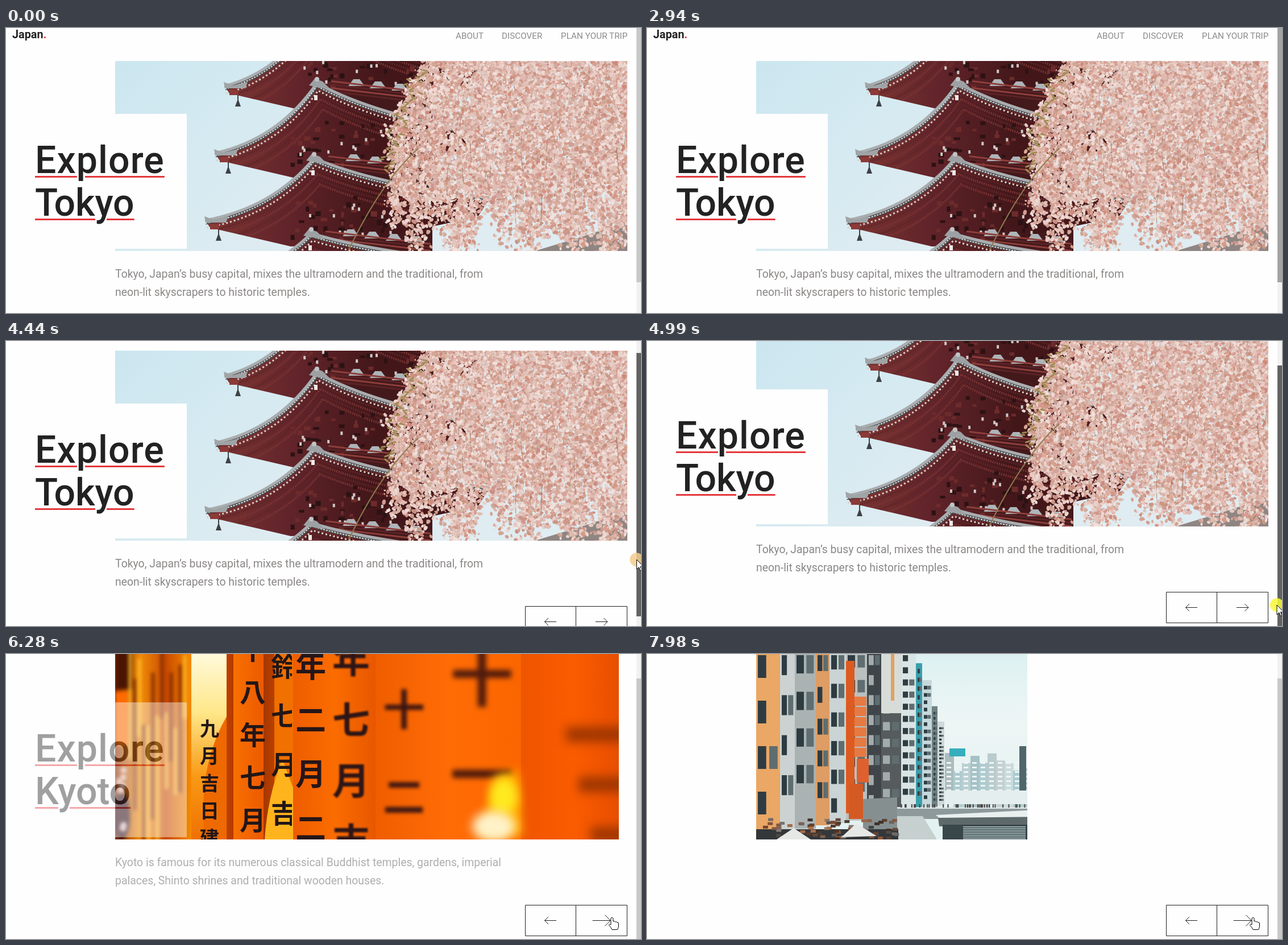
Write an HTML page with a canvas that moves like this. It is 1117x501 px and loops after 8 s.

```html
<!DOCTYPE html>
<html lang="en">
<head>
<meta charset="utf-8">
<title>Japan</title>
<style>
html, body { margin: 0; width: 100%; height: 100%; overflow: hidden; background: #fefefe; }
#stage { position: relative; width: 1117px; height: 501px; overflow: hidden; font-family: Roboto, sans-serif; color: #222; }
#stage div, #stage svg, canvas { position: absolute; }
#page { width: 1117px; height: 600px; }
.logo { left: 11px; top: 2px; font: bold 19.8px/20px Roboto, sans-serif; }
.logo i { color: #e0393e; font-style: normal; }
.nav { top: 4px; font-size: 15.3px; line-height: 20px; color: #8b8b8b; white-space: nowrap; }
#photo { left: 192px; top: 58px; height: 334px; overflow: hidden; }
canvas { left: 0; top: 0; }
#heading { left: 51px; top: 151px; width: 267px; height: 237px; background: #fefefe; }
#title { top: 44px; font-size: 66px; line-height: 75px; font-weight: 500; white-space: pre;
  text-decoration: underline #e5383d 3px; text-underline-offset: 5px; }
#title::first-line { letter-spacing: 1.1px; }
#text { left: 192px; top: 417px; font-size: 19.42px; line-height: 32px; color: #8b8887; white-space: pre; }
#next { vector-effect: non-scaling-stroke; }
#overlay { left: 0; top: 0; }
#track { left: 1109px; top: 0; width: 8px; height: 501px; background: #f1f1f1; }
#thumb { width: 8px; height: 463px; }
</style>
</head>
<body>
<div id="stage">
  <div id="page">
    <div class="logo">Japan<i>.</i></div>
    <div class="nav" style="left:791px">ABOUT</div>
    <div class="nav" style="left:872px">DISCOVER</div>
    <div class="nav" style="left:976px">PLAN YOUR TRIP</div>
    <div id="photo"></div>
    <div id="heading"><div id="title"></div></div>
    <div id="text"></div>
    <svg style="left:913px;top:507px" width="180" height="55" fill="none" stroke="#222">
      <path d="M.5 .5H179.5V54.5H.5ZM89.5 .5V54.5"/>
      <path d="M55 27.5H34.5M41 21L34.5 27.5L41 34"/>
      <path id="next" d="M-10.5 0H10.5M4 -6.5L10.5 0L4 6.5"/>
    </svg>
  </div>
  <div id="track"><div id="thumb"></div></div>
  <svg id="overlay" width="1117" height="501">
    <g id="cursor" fill="#fff" stroke="#000">
      <circle id="press" r="12" stroke="none"/>
      <path id="arrow" d="M0 0V17L4 13.5L6.5 19.5L9 18.5L6.5 12.5H12Z"/>
      <path id="hand" d="M-2 1.5Q0-1.5 2 1.5V7Q4 5.5 5.5 8Q8 6.5 9 9Q11.5 8 11.5 11V16Q11 19 9.5 21.5H0Q-2 17-5.5 13.5Q-5 11-2 13Z"/>
    </g>
  </svg>
</div>
<script>
const $ = id => document.getElementById(id);
const clamp = v => Math.max(0, Math.min(1, v));
const easeOut = v => 1 - (1 - clamp(v)) ** 3;
const between = (t, a, b) => t >= a && t < b;

function seeded(seed) {
  return () => (seed = (seed * 16807) % 2147483647) / 2147483647;
}

// Painters work in stage coordinates; `top` is the stage y of the photo's upper edge.
function photo(top, paint) {
  const canvas = document.createElement('canvas');
  canvas.width = 901;
  canvas.height = 334;
  const c = canvas.getContext('2d');
  c.translate(-192, -top);
  const rect = (color, x, y, w, h) => { c.fillStyle = color; c.fillRect(x, y, w, h); };
  const shape = (color, d) => { c.fillStyle = color; c.fill(new Path2D(d)); };
  const dot = (color, x, y, rx, ry = rx, turn = 0) => {
    c.fillStyle = color;
    c.beginPath();
    c.ellipse(x, y, rx, ry, turn, 0, 7);
    c.fill();
  };
  const gradient = (x0, y0, x1, y1, ...colors) => {
    const g = c.createLinearGradient(x0, y0, x1, y1);
    colors.forEach((color, i) => g.addColorStop(i / (colors.length - 1), color));
    return g;
  };
  paint({ c, rect, shape, dot, gradient });
  $('photo').append(canvas);
  return canvas;
}

function paintPagoda({ c, rect, shape, dot, gradient }) {
  const rnd = seeded(71);
  rect(gradient(192, 58, 500, 392, '#cbe6f0', '#d6eaf1', '#dfecf1'), 192, 58, 901, 334);
  rect('#43191c', 535, 58, 215, 334);

  for (let tier = 0; tier < 4; tier++) {
    const left = 385 - 17 * tier, eave = 103 + 118 * tier;
    const peak = 552 - 5 * tier, ridge = -34 + 132 * tier;
    const right = 830 + 10 * tier, end = 70 + 115 * tier;
    const curve = `M${left} ${eave}Q${left + .62 * (peak - left)} ${eave - .2 * (eave - ridge)} ${peak} ${ridge}` +
      `Q${peak + .35 * (right - peak)} ${ridge + .65 * (end - ridge)} ${right} ${end}`;
    const edge = new Path2D(curve);
    const soffit = new Path2D(`${curve}l-20 32L${peak + 60} ${ridge + 150}L${left + 150} ${eave + 45}l-142 -33Z`);
    const line = (color, width, dx, dy, ...dash) => {
      c.save();
      c.translate(dx, dy);
      c.strokeStyle = color;
      c.lineWidth = width;
      c.setLineDash(dash);
      c.stroke(edge);
      c.restore();
    };
    for (let i = 0; i < 4; i++) {
      shape(i % 2 ? '#5c2325' : '#8d3e3b', `M${peak + 25} ${ridge - 6 + i * 6}l185 22v3l-185 -22Z`);
    }
    c.save();
    c.clip(soffit);
    rect(gradient(left, 0, peak + 100, 0, '#7a3432', '#61242a', '#43171a'), left, ridge, right - left, 200);
    for (let i = 1; i < 6; i++) line(i % 2 ? '#7b3433' : '#5f2426', 4, 2 * i, 9 * i, 2, 2);
    for (let i = 0; i < 45; i++) {
      rect(rnd() < .65 ? '#2d1214' : '#6d2b2b', peak - 50 + rnd() * 250, ridge + 65 + rnd() * 75, 4 + rnd() * 8, 4 + rnd() * 6);
    }
    for (let i = 0; i < 10; i++) rect('#cfc7c4', peak - 45 + rnd() * 200, ridge + 75 + rnd() * 55, 4, 6);
    c.restore();
    line('#d9d0cc', 3, 2, 12, 3, 4);
    line('#4d4a4d', 9, 0, 2);
    line('#a9adaf', 5, 0, -1);
    line('#dde0e0', 2, 0, 4, 3, 2);
    shape('#a0a4a6', `M${left - 2} ${eave - 8}l16 6l26 -6l-4 11h-36Z`);
    shape('#8b3a37', `M${left + 8} ${eave + 6}h16v9h-16Z`);
    shape('#3d4245', `M${left + 22} ${eave + 15}h2v9l4 11h-10l4 -11Z`);
    shape('#9da1a4', `M${peak - 14} ${ridge + 3}l10 -12l14 5l14 14Z`);
    dot('#c1c4c5', peak, ridge - 8, 4);
    rect('#eeeae8', peak - 5, ridge + 20, 6, 9);
    for (let i = 0; i < 4; i++) shape('#aeb5b9', `M${peak + 50 + i * 38} ${ridge + 136 + i * 4}l9 -12h11l9 12Z`);
  }
  shape('#8f8582', 'M930 392L1010 368L1093 340V392Z');

  // Hanging strands of blossom; the outer ones lean to the left.
  const spread = () => rnd() + rnd() - 1;
  for (let i = 0; i < 110; i++) {
    const root = 742 + i * 3.3 + spread() * 8;
    const lean = -65 * (1 - i / 110) ** 2, length = 230 + 130 * rnd();
    const at = u => root + lean * Math.sin(Math.min(1, u * 1.6) * 1.57) + 5 * Math.sin(u * 9 + i);
    for (let u = 0; u < 1; u += .007) {
      const size = 1.5 + rnd() * 3.2;
      const color = `hsl(${8 + rnd() * 10} ${34 + rnd() * 16}% ${64 + rnd() * 27}%)`;
      dot(color, at(u) + spread() * 18, 56 + u * length + spread() * 8, size, size * .7, rnd() * 3);
    }
    if (i % 3) continue;
    c.strokeStyle = '#8a6a5099';
    c.lineWidth = 1.2;
    c.beginPath();
    const start = rnd() * .6;
    for (let u = start; u < start + .4; u += .05) c.lineTo(at(u), 58 + u * length);
    c.stroke();
  }
  for (let i = 0; i < 45; i++) dot('#a08b55', 730 - 55 * Math.sin(i / 30) + spread() * 18, 75 + i * 4, 5, 1.6, spread());
  c.strokeStyle = '#8f7a4f';
  c.lineWidth = 2;
  c.stroke(new Path2D('M725 212Q660 270 602 392'));
}

function paintGates({ c, rect, shape, dot, gradient }) {
  const rnd = seeded(19);
  const blur = px => c.filter = px ? `blur(${px}px)` : 'none';
  const pillar = (x, width, ...colors) => rect(gradient(x, 0, x + width, 0, ...colors), x, -8, width, 334);
  pillar(192, 134, '#8a2b00', '#f08a08', '#c94a00', '#f58a00');
  blur(3);
  rect('#4a1500', 192, -8, 30, 70);
  rect('#ff6b00', 192, 66, 24, 95);
  for (let i = 0; i < 13; i++) rect(`hsl(${i % 2 ? 18 : 42} 100% ${i % 2 ? 24 : 58}%)`, 216 + i * 8, rnd() * 150 - 10, 5, 110 + rnd() * 170);
  dot('#35141c', 203, 285, 15, 42);
  for (let i = 0; i < 7; i++) dot('#f3d9df', 199 + rnd() * 8, 170 + rnd() * 145, 5);
  blur(0);
  rect(gradient(0, -8, 0, 326, '#fffbe0', '#ffe789', '#f99a16', '#ef7000'), 326, -8, 62, 334);
  shape('#ee6a00', 'M388 110V326H350Q336 200 388 110Z');
  pillar(388, 12, '#c04000', '#b33a00');
  pillar(400, 53, '#f87000', '#ec5a00');
  pillar(453, 19, '#a63600', '#b84000');
  pillar(472, 33, '#f07000', '#f07000');
  shape('#ffb41d', 'M455 326Q460 250 486 185L505 235V326Z');
  pillar(505, 145, '#ee5d00', '#fb6c00', '#e85700');
  pillar(650, 256, '#f05d00', '#ff6c06', '#fb6500');
  pillar(906, 187, '#ef5500', '#fa5c00', '#e54c00');

  // Inscriptions grow and lose focus towards the right.
  function column(text, x, size, y, pitch) {
    const focus = clamp((x - 500) / 340);
    blur(focus * 5);
    c.fillStyle = `hsl(${350 + focus * 24} ${20 + focus * 55}% ${11 + focus * 7}%)`;
    c.font = `bold ${size}px "Noto Sans CJK JP", "Noto Sans CJK", sans-serif`;
    c.textAlign = 'center';
    c.textBaseline = 'middle';
    [...text].forEach((glyph, i) => c.fillText(glyph, x, y + i * pitch));
    blur(0);
  }
  column('九月吉日建', 358, 34, 131, 48);
  column('十八年七月', 434, 46, -8, 75);
  c.save();
  c.beginPath();
  c.rect(466, -8, 37, 334);
  c.clip();
  column('鈴七月吉', 489, 46, 22, 86);
  c.restore();
  column('年二月二', 536, 54, 20, 95);
  column('年七月吉', 607, 66, 8, 107);
  column('十二', 700, 74, 97, 153);
  column('十一', 837, 112, 40, 172);
  blur(9);
  for (let i = 0; i < 3; i++) rect('#9f3600', 985 + i * 22, 128 + i * 88, 110, 27);
  shape('#ffb000', 'M835 320L862 214L900 205L908 320Z');
  dot('#ffea20', 875, 250, 24, 32);
  dot('#fff2c8', 858, 303, 38, 27);
  blur(0);
}

function paintCanal({ rect, shape, gradient }) {
  const rnd = seeded(8);
  rect(gradient(0, -8, 0, 260, '#dcf0f1', '#eef6f5', '#e3f1f1'), 192, -8, 901, 334);
  for (let x = 524; x < 1093; x += 15) {
    rect(`hsl(188 ${12 + rnd() * 22}% ${70 + rnd() * 18}%)`, x, 172 + rnd() * 45, 16, 90);
    for (let y = 190; y < 240; y += 8) rect('#eef5f5', x + 3, y, 8, 3);
  }
  rect('#37aebd', 532, 166, 28, 14);
  rect('#50666b', 655, 162, 12, 100);
  rect('#e4eeee', 500, 240, 593, 24);

  // Facades stand side by side; windows get denser with distance.
  const facades = [['#eaa765', 42], ['#ccd2d1', 26], ['#abb3b2', 37], ['#dd9d64', 24], ['#cbd4d4', 29], ['#b9c0bf', 37],
    ['#3f4549', 25], ['#565b5d', 35], ['#d9e4e4', 26], ['#3a9eac', 11], ['#c6d8db', 17], ['#6f8184', 10], ['#cfd9da', 12]];
  let x = 192;
  for (const [color, width] of facades) {
    const top = Math.max(-8, (x - 467) * 2.7);
    const pitch = 80 - (x - 192) * .23;
    rect(color, x, top, width, 318 - (x - 192) * .16 - top);
    for (let y = top + 10; y < 255; y += pitch) {
      rect(x > 380 && x < 440 ? '#a3acad' : '#2e3c42', x + 3, y, width * .35, pitch * .5);
      if (rnd() < .7) rect('#5f6d70', x + width * .55, y, width * .35, pitch * .5);
    }
    x += width;
  }
  rect('#dd5b20', 350, 12, 15, 268);
  for (let y = 75; y < 180; y += 18) rect('#e57a43', 365, y, 21, 16);
  rect('#de602f', 369, 184, 21, 42);
  rect('#d45a24', 355, 228, 25, 62);
  rect('#d8dcd9', 412, -8, 36, 112);
  rect('#e0a163', 429, -8, 6, 90);

  shape('#858f90', 'M380 255L440 252V326H380Z');
  rect('#8d999a', 440, 271, 653, 19);
  rect('#dbe5e4', 440, 269, 653, 3);
  for (let i = 0; i < 45; i++) rect('#4c4545', 445 + rnd() * 220, 264, 2, 6);
  shape('#c5d0cf', 'M440 285H485L510 326H440Z');
  shape('#e8efee', 'M508 283L666 275H1093V284L516 290Z');
  shape('#5e696b', 'M512 288L1093 282V300L514 303Z');
  rect('#39464a', 520, 300, 573, 26);
  for (let y = 303; y < 326; y += 3) rect('#b8cccd', 556, y, 110, 1.4);
  rect('#33373a', 192, 308, 250, 18);
  for (let i = 0; i < 70; i++) rect(`hsl(22 ${rnd() * 45}% ${20 + rnd() * 30}%)`, 192 + rnd() * 245, 288 + rnd() * 34, 9, 5);
  shape('#e5e8e5', 'M228 326L258 306L288 326ZM342 322L368 298L404 320Z');
}

const slides = [
  { start: -2000, canvas: photo(58, paintPagoda), title: 'Explore\nTokyo',
    text: 'Tokyo, Japan’s busy capital, mixes the ultramodern and the traditional, from\nneon-lit skyscrapers to historic temples.' },
  { start: 5534, canvas: photo(-8, paintGates), title: 'Explore\nKyoto',
    text: 'Kyoto is famous for its numerous classical Buddhist temples, gardens, imperial\npalaces, Shinto shrines and traditional wooden houses.' },
  { start: 7759, canvas: photo(-8, paintCanal), title: '', text: '' }
];

// Pointer moves: start, end, x and y reached.
const moves = [
  [390, 1020, 1005, 286], [1020, 1150, 1064, 302], [1220, 1510, 934, 383], [2110, 2530, 1058, 257],
  [2800, 2930, 1130, 300], [3630, 4040, 1110, 347], [4185, 4990, 1108, 464], [5060, 5380, 1066, 463]
];

function pointer(t) {
  return moves.reduce(([x, y], [start, end, toX, toY]) => {
    const k = clamp((t - start) / (end - start));
    return [x + k * (toX - x), y + k * (toY - y)];
  }, [1066, 502]);
}

let current;
function show(slide) {
  if (slide === current) return;
  current = slide;
  slides.forEach(s => s.canvas.style.display = s === slide ? 'block' : 'none');
  $('title').textContent = slide.title;
  $('text').textContent = slide.text;
}

function render(t) {
  const slide = slides.findLast(s => t >= s.start - 9);
  show(slide);
  const age = t - slide.start;
  $('photo').style.width = Math.round(901 * easeOut(age / 1000)) + 'px';
  $('heading').style.opacity = clamp((age - 400) / 820);
  $('text').style.opacity = easeOut((age - 440) / 980);

  const [x, y] = pointer(t);
  const scroll = t < 4185 ? 0 : t > 5060 ? 66 : Math.min(66, Math.round((y - 347) / .9));
  $('page').style.top = -scroll + 'px';
  $('thumb').style.top = Math.round(scroll * .9) - 16 + 'px';
  $('thumb').style.background = between(t, 4040, 5060) ? '#636363' : between(t, 2900, 4040) ? '#a3a3a3' : '#c8c8c8';

  const overButton = t >= 5340;
  $('next').setAttribute('transform', `translate(134.5 27.5) scale(${1 + .5 * clamp((t - 5300) / 200)})`);
  $('cursor').setAttribute('transform', `translate(${x} ${y})`);
  $('arrow').style.display = overButton ? 'none' : '';
  $('hand').style.display = overButton ? '' : 'none';
  const pressed = between(t, 4040, 5060) || between(t, 5400, 5525) || between(t, 7620, 7750);
  $('press').style.display = pressed ? '' : 'none';
  $('press').style.fill = t < 4700 ? '#f4cd8fdd' : '#f8f83cdd';
}

const begin = performance.now();
function tick() {
  render((performance.now() - begin) % 8000);
  requestAnimationFrame(tick);
}
tick();
</script>
</body>
</html>
```
